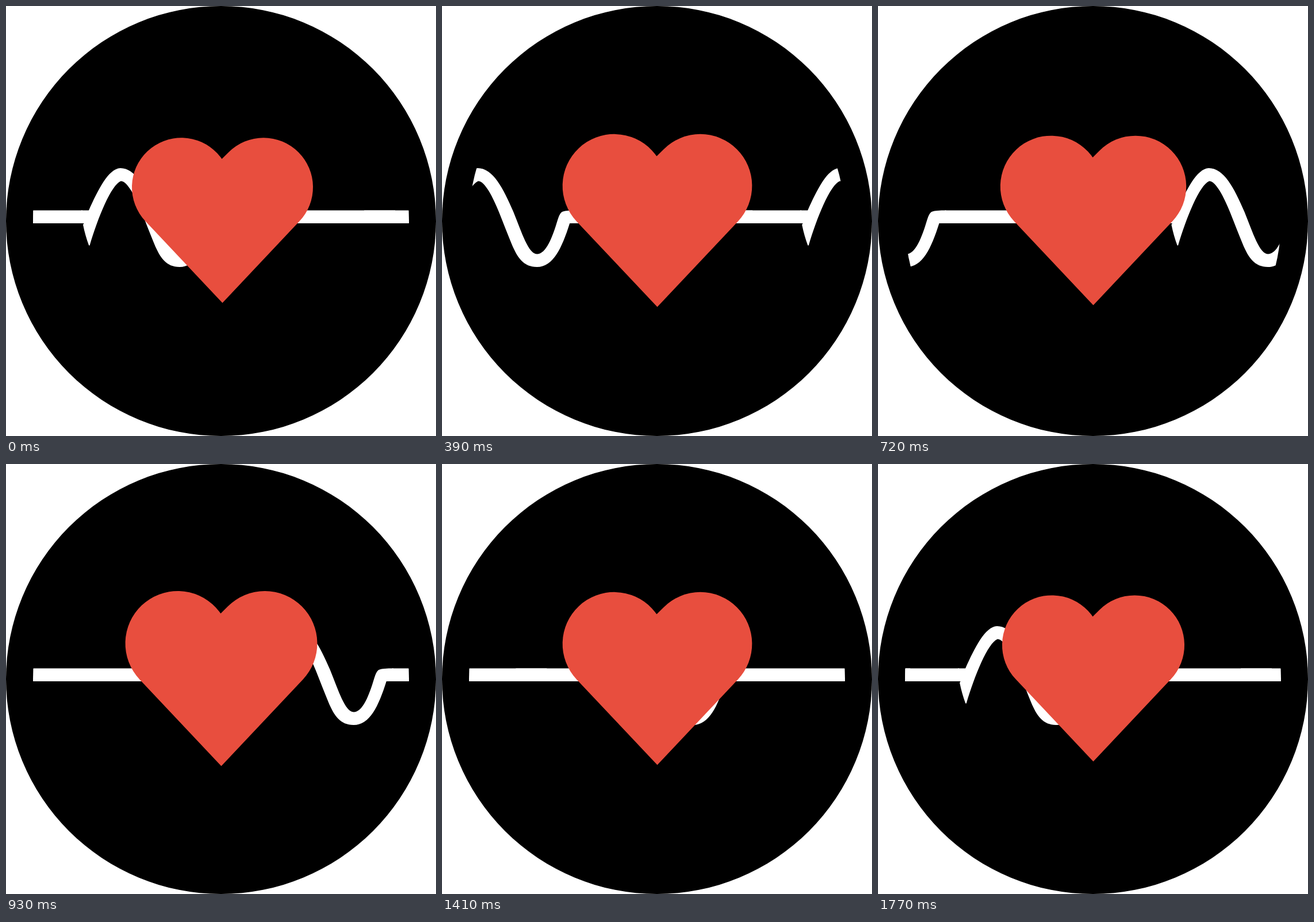
These frames come from a looping animation (748x748 px, 1.8 s). An HTML page with a canvas:

```html
<!DOCTYPE html>
<html lang="en">
<head>
<meta charset="utf-8">
<title>Heartbeat</title>
<style>
html, body { margin: 0; width: 100%; height: 100%; overflow: hidden; background: #fff; }
canvas { display: block; width: 748px; height: 748px; }
</style>
</head>
<body>
<canvas id="stage" width="748" height="748"></canvas>
<script>
const ctx = document.getElementById('stage').getContext('2d');
const LOOP = 1800, STEP = 30, BEAT = 600;
const PERIOD = 629, SPEED = 0.3508;
const TOP = 355.5, BOTTOM = 378;

function disc(x, y, r) {
  ctx.beginPath();
  ctx.arc(x, y, r, 0, Math.PI * 2);
}

// One pulse; x = 0 is the tip of the lower spike.
const pulse = new Path2D(`
  M -14 ${TOP} L -1 ${TOP}
  C 15 320 33 283 54 282
  C 80 282 98 316 116 358
  C 131 395 142 431 157 431.5
  C 173 431.5 184 402 193 372
  Q 196 362 200 358.5 Q 203 356 218 ${TOP}
  L 226 ${TOP} L 226 ${BOTTOM} L 214 ${BOTTOM}
  C 200 422 185 454 157 454
  C 134 454 123 438 113 414
  C 106 397 99 379 91.5 360
  C 80 331 66 305 55 304.5
  C 38 311 15 368 0.6 416.5
  L -0.8 416.5
  Q -7 400 -11 380.5
  L -9.5 ${BOTTOM} L -14 ${BOTTOM} Z`);

function drawPulse(x) {
  ctx.save();
  ctx.translate(x, 0);
  ctx.fill(pulse);
  // Two flat stretches that overlap between 478 and 532.
  ctx.fillRect(224, TOP, 308, BOTTOM - TOP);
  ctx.fillRect(478, TOP, PERIOD - 490, BOTTOM - TOP);
  ctx.restore();
}

function drawLine(t) {
  ctx.save();
  disc(374, 374, 327);
  ctx.clip();
  ctx.fillStyle = '#fff';
  const x = 145 - SPEED * t;
  for (let i = -1; i <= 2; i++) drawPulse(x + i * PERIOD);
  ctx.restore();
}

function drawHeart(t) {
  const phase = (t % BEAT) / BEAT;
  const k = 1 - Math.abs(2 * phase - 1);
  const scale = 1 + k / 15;
  const slide = Math.max(0, 1 - t / 300);
  const cx = 71.5, cy = -57.8, r = 86;
  const low = 0.756, notch = Math.PI * 1.25;

  ctx.save();
  ctx.translate(374.5 + 2 * slide, 373.1 + 0.4 * k);
  ctx.scale(scale, scale);
  ctx.beginPath();
  ctx.moveTo(0, -108);
  ctx.arc(cx, cy, r, notch, Math.PI * 2 + low);
  ctx.lineTo(0, 143.5);
  ctx.arc(-cx, cy, r, Math.PI - low, Math.PI * 3 - notch + Math.PI);
  ctx.closePath();
  ctx.fillStyle = '#e84e3e';
  ctx.fill();
  ctx.restore();
}

function draw(now) {
  const t = Math.floor((now % LOOP) / STEP) * STEP;
  ctx.fillStyle = '#fff';
  ctx.fillRect(0, 0, 748, 748);
  disc(374, 374, 374);
  ctx.fillStyle = '#000';
  ctx.fill();
  drawLine(t);
  drawHeart(t);
}

const start = performance.now();
function frame() {
  draw(performance.now() - start);
  requestAnimationFrame(frame);
}
frame();
</script>
</body>
</html>
```
